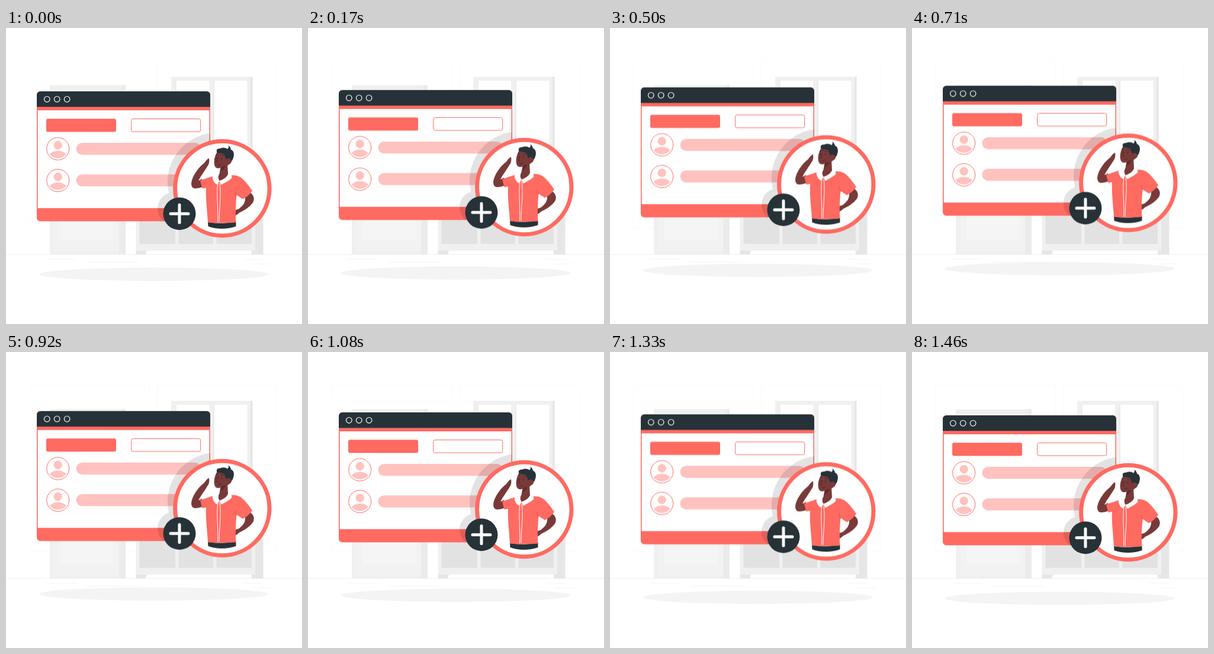
Recreate the animation shown at these times as an HTML page. Size 500 by 500 pixels, loop 1500 ms.

```html
<!DOCTYPE html>
<html lang="en">
<head>
<meta charset="utf-8">
<title>Add contact</title>
<style>
  html, body { margin: 0; width: 100%; height: 100%; overflow: hidden; background: #fff; }
  svg { display: block; width: 100vw; height: 100vh; }
  .coral { fill: #ff6a61; }
  .pink { fill: #ffc2bf; }
  .dark { fill: #263238; }
  .skin { fill: #783a38; }
  .white { fill: #fff; }
  .line { fill: none; stroke: #ff6a61; }
  .float { animation: float 750ms steps(18, jump-none) -4ms infinite alternate; }
  @keyframes float {
    from { transform: translateY(0); }
    to { transform: translateY(-9.44px); }
  }
</style>
</head>
<body>
<svg viewBox="0 0 500 500">
  <defs>
    <clipPath id="frame"><rect x="52" y="107" width="293" height="219.5" rx="6"/></clipPath>
    <g id="avatar">
      <circle class="white" r="19"/>
      <circle class="line" r="19"/>
      <circle class="pink" cy="-6" r="7.2"/>
      <path class="pink" d="M-14 9.500C-11 5.500-6 3.500 0 3.500S11 5.500 14 9.500C10 14 5 16 0 16S-10 14-14 9.500Z"/>
    </g>
  </defs>

  <!-- room -->
  <g fill="none" stroke="#fafafa">
    <rect x="39.500" y="55.500" width="203" height="282"/>
    <rect x="255.500" y="55.500" width="202" height="282"/>
  </g>
  <path d="M0 382.500H500" stroke="#f0f0f0"/>
  <path d="M66 390.500H118M135 395.500H224M402 390.500H435M416 398.500H449" stroke="#f5f5f5"/>

  <!-- wardrobe -->
  <path fill="#f0f0f0" d="M74 96.500H202V382.500H74Z"/>
  <path fill="#ebebeb" d="M191 376.500H202V96.500H195V104H191Z"/>
  <path fill="#f5f5f5" d="M82 104H191V376.500H82Z"/>
  <path fill="#f0f0f0" d="M82 104H191V376.500H82Z" opacity=".6"/>
  <path fill="#f5f5f5" d="M92 114H181.500V359H92Z"/>
  <path fill="#ebebeb" d="M191 326H202V382.500H191Z"/>

  <!-- cabinet -->
  <path fill="#f0f0f0" d="M279 82.500H416.500V260H279Z"/>
  <path fill="#e6e6e6" d="M413 82.500H416.500V260H413Z"/>
  <path fill="#fff" d="M287.500 89H343V260H287.500ZM352 89H407.500V260H352Z"/>
  <path fill="#ebebeb" d="M285.500 89H287.500V260H285.500ZM350 89H352V260H350Z"/>
  <path fill="#f0f0f0" d="M219.500 250H421V376H219.500Z"/>
  <path fill="#e6e6e6" d="M421 250H434.500V382.500H415V376H421Z"/>
  <path fill="#e2e2e2" d="M225.500 258H286V364.500H225.500ZM291.500 258H350V364.500H291.500ZM355.500 258H415V364.500H355.500Z"/>
  <path fill="#e6e6e6" d="M219.500 376H238L236 382.500H219.500Z"/>

  <g class="float">
    <ellipse cx="249.500" cy="416" rx="194" ry="11.200" fill="#f4f4f4"/>

    <!-- window -->
    <g clip-path="url(#frame)">
      <path class="coral" d="M52 107H345V327H52Z"/>
      <path class="dark" d="M52 107H345V133.300H52Z"/>
      <path class="white" d="M53.600 139H343.500V304.300H53.600Z"/>
      <g fill="none" stroke="#fff" stroke-width="1.200">
        <circle cx="69.300" cy="120.300" r="4.800"/>
        <circle cx="86.200" cy="120.300" r="4.800"/>
        <circle cx="103.100" cy="120.300" r="4.800"/>
      </g>
      <rect class="coral" x="68" y="153.200" width="118" height="22.200" rx="3"/>
      <rect class="line" x="211.700" y="153.500" width="117" height="21.600" rx="3"/>
      <use href="#avatar" x="87.700" y="204"/>
      <use href="#avatar" x="87.700" y="257.500"/>
      <rect class="pink" x="118.500" y="194" width="211" height="20.200" rx="10.100"/>
      <rect class="pink" x="118.500" y="247.300" width="211" height="20.200" rx="10.100"/>
      <g opacity=".11">
        <circle cx="356" cy="260" r="83"/>
        <circle cx="283.500" cy="305" r="27.500"/>
      </g>
    </g>

    <!-- portrait -->
    <circle cx="365.300" cy="271" r="79.700" fill="#fff" stroke="#ff6a61" stroke-width="7"/>
    <path class="skin" d="M343 220C340 221 337 225 335 228C326 235 318 245 314 257C312 264 313 270 319 271C324 271 328 270 333 268L331 255L325 258C329 250 336 241 340 234C343 230 344 226 343 220Z"/>
    <path class="skin" d="M411 277C418 281 421 288 417 295C411 303 403 308 394 312C390 316 384 320 379 318C376 316 377 310 381 308C387 307 391 307 394 305C400 300 405 295 404 285Z"/>
    <path class="dark" d="M341 327.500C356 331 374 330 388.500 327V335C374 340.500 354 340 341.500 335Z"/>
    <path class="coral" d="M350 250L328 257.500L331.500 271L338 270C337 290 340 308 341 328.500C356 330 374 329.500 388.500 328.500C387.500 313 388 299 389.500 282L400 289C406 286 412 281 416 275C410 266 404 258 396 252C391 249 385 248 380 249L364 257Z"/>
    <path fill="none" stroke="#d94f49" stroke-width=".8" d="M389.500 283L387 275"/>
    <path class="white" d="M349 250C352 247 356 246 361 247L378 246C381 248 382 251 381 254C375 259 368 262 364 265L360.500 259L356 264.500C351 261 348 255 349 250Z"/>
    <path fill="none" stroke="#fff" stroke-width="1" d="M358 261C355 282 359 306 357.500 328M361 261C364 282 360 306 360 328"/>
    <path class="skin" d="M363 232L360.500 246C358 250 358 254 360.500 258C367 256 373 252 375 247L374 228Z"/>
    <path fill="#5c2b2a" d="M364 234L362 242C367 240 370 236 371 231Z"/>
    <path class="skin" d="M357 209C352 216 350 227 353 234C356 239 363 237 367 233C373 234 378 231 380 226L378 212Z"/>
    <path class="dark" d="M357 211C354 206 357 203 362 203.500C366 201.500 371 202 374 204.500C376 203 376.500 201 375.500 198.500C378 200.500 380 203 380 205.500C385 207 386 214 384 219C383 223 381 226 379 226L377 221C375 220 373 221 372 222L369 214C366 211 361 211 357 211Z"/>
    <circle class="skin" cx="376.500" cy="225" r="4.500"/>
    <g fill="none" stroke="#263238" stroke-linecap="round">
      <path stroke-width="1" d="M355 214.500L358 213.500M363.500 214L367 216"/>
      <path stroke-width="1.500" d="M356 219V220M364 220V221"/>
      <path stroke="#4d2322" stroke-width=".9" d="M358.500 219L355.500 226L358 226.500M358 231.500C360 231 362 231 363.500 230"/>
    </g>

    <!-- add button -->
    <circle class="dark" cx="293" cy="313.700" r="27.500"/>
    <path d="M278 313.700H308M293 298.700V328.700" stroke="#fff" stroke-width="5" stroke-linecap="round"/>
  </g>
</svg>
</body>
</html>
```
